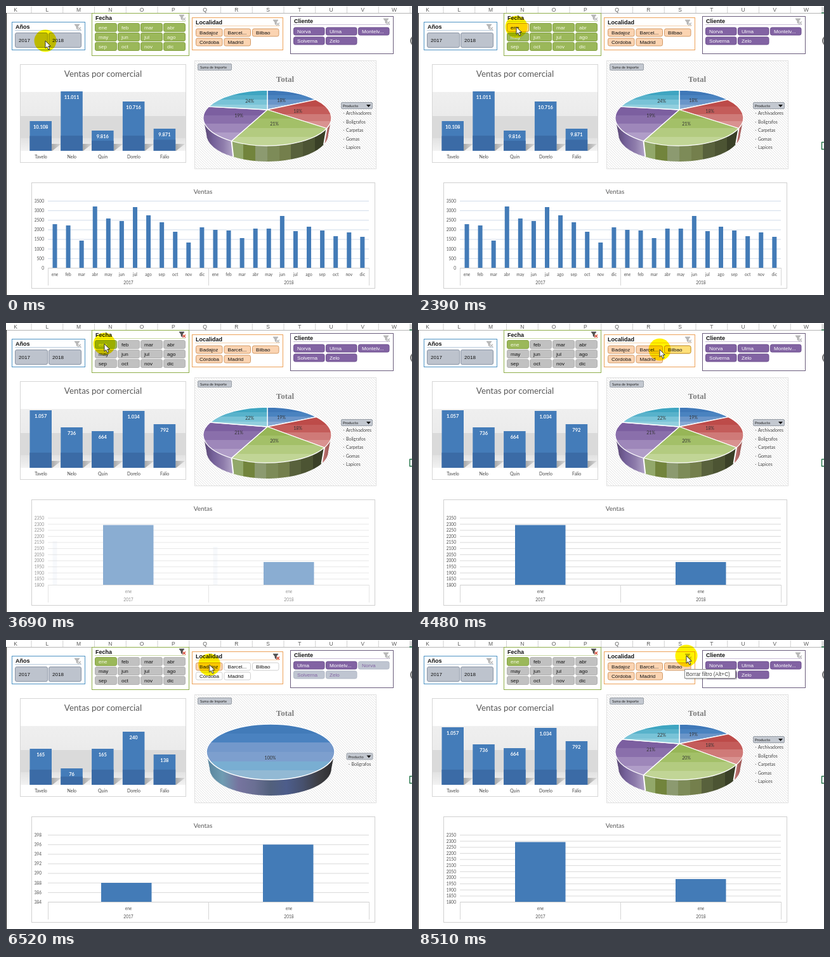
Recreate the animation shown at these times as an HTML page. Size 640 by 457 pixels, loop 9.77 s.

```html
<!DOCTYPE html>
<html lang="es">
<head>
<meta charset="utf-8">
<title>Panel de ventas</title>
<style>
  html, body { margin: 0; width: 100%; height: 100%; overflow: hidden; background: #fff; }
  svg { display: block; width: 640px; height: 457px; }
  text { font-family: Lato, sans-serif; white-space: pre; }
  .ui { font-family: "Liberation Sans", Arial, sans-serif; }
  .serif { font-family: "Liberation Serif", serif; }
  .b { font-weight: 700; }
  .mark { mix-blend-mode: multiply; }
</style>
</head>
<body>
<svg id="stage" viewBox="0 0 640 457" xmlns="http://www.w3.org/2000/svg"></svg>
<script>
const LOOP = 9770;
const stage = document.getElementById('stage');
const MONTHS = 'ene feb mar abr may jun jul ago sep oct nov dic'.split(' ');
const BLUE = '#437bb7';

// ---------- drawing helpers ----------
function layer(html, parent = stage) {
  const g = document.createElementNS('http://www.w3.org/2000/svg', 'g');
  g.innerHTML = html;
  parent.appendChild(g);
  return g;
}
const text = (x, y, s, size, fill = '#505050', anchor = 'start', cls = '') =>
  `<text x="${x}" y="${y}" font-size="${size}" fill="${fill}" text-anchor="${anchor}" class="${cls}">${s}</text>`;
const rect = (x, y, w, h, fill, stroke = 'none', r = 0) =>
  `<rect x="${x}" y="${y}" width="${w}" height="${h}" fill="${fill}" stroke="${stroke}" rx="${r}"/>`;
const path = (d, fill, stroke = 'none', sw = 1) =>
  `<path d="${d}" fill="${fill}" stroke="${stroke}" stroke-width="${sw}" stroke-linejoin="round"/>`;
const grad = (id, colors, down, hard) => {
  const n = colors.length;
  const stops = colors.map((c, i) => hard
    ? `<stop offset="${i / n}" stop-color="${c}"/><stop offset="${(i + 1) / n}" stop-color="${c}"/>`
    : `<stop offset="${i / (n - 1)}" stop-color="${c}"/>`).join('');
  return `<linearGradient id="${id}" x2="${down ? 0 : 1}" y2="${down ? 1 : 0}">${stops}</linearGradient>`;
};

// ---------- timing helpers ----------
function play(el, frames) {
  el.animate(frames, { duration: LOOP, iterations: Infinity });
}
// spans: [from, to, fadeIn, fadeOut]; one running to LOOP stays on to the end
function on(el, ...spans) {
  const f = [];
  const key = (t, opacity) => f.push({ offset: t / LOOP, opacity });
  if (spans[0][0] > 0) key(0, 0);
  for (const [a, b, fi = 0, fo = 0] of spans) {
    if (a > 0) key(a, 0);
    key(a + fi, 1);
    key(b, 1);
    if (b < LOOP) key(b + fo, 0);
  }
  if (f[f.length - 1].offset < 1) key(LOOP, 0);
  play(el, f);
}
function travel(el, pts) {
  play(el, pts.map(([t, x, y]) => ({
    offset: t / LOOP, transform: `translate(${x}px, ${y}px)`, easing: 'ease-in-out' })));
}

// ---------- gradients, hatch, sheet ----------
layer('<defs>' +
  grad('s0', ['#3f78b8', '#4a83c0', '#6a95c9', '#86a9d3'], 1, 1) +
  grad('s1', ['#bd4b49', '#c45c5a', '#cf7a78', '#d99290'], 1, 1) +
  grad('s2', ['#97b657', '#a3c068', '#b3cb80', '#c1d596'], 1, 1) +
  grad('s3', ['#7c5fa0', '#8a6fab', '#9e87ba', '#b09dc8'], 1, 1) +
  grad('s4', ['#3fa5c1', '#58b2cb', '#79c3d7', '#92cfde'], 1, 1) +
  grad('whole', ['#427bb9', '#4a82c0', '#7398cb', '#7d9fce', '#79aed2', '#92b9d4'], 1, 1) +
  grad('sideP', ['#57456f', '#75619a', '#8e7cab', '#b3a6c9']) +
  grad('sideG', ['#92a86a', '#72843c', '#8c9a70', '#7d8b58', '#747f4c', '#58613c', '#4c5433', '#3a4027'], 0, 1) +
  grad('sideR', ['#c98280', '#8f4644']) +
  grad('sideB', ['#56829b', '#6f9cb2', '#76749f', '#6a6f93', '#52607c', '#4d5d8b', '#47516e', '#3e3f44', '#2c2c2e'], 0, 0) +
  grad('wall', ['#efefef', '#ebebeb'], 1) +
  grad('floor', ['#e2e2e2', '#f2f2f2'], 1) +
  grad('shade', ['#a8a8a8', '#dadada']) +
  '<pattern id="hatch" width="4" height="4" patternUnits="userSpaceOnUse">' +
  '<path d="M-1-1L5 5M-1 3L1 5M3-1L5 1" stroke="#dcdcdc" stroke-width=".8"/></pattern></defs>');

let sheet = rect(0, 0, 640, 457, '#fff') + path('M0 11.5H640', 'none', '#b5b5b5') + path('M.5 11V457', 'none', '#111');
[...'KLMNOPQRSTUVW'].forEach((c, i) => {
  const x = 15 + 49.75 * i;
  sheet += text(x, 9, c, 8.5, '#5a5a5a', 'middle', 'ui') + path(`M${x + 25} 1V11`, 'none', '#d0d0d0');
});
sheet += '<circle cx="646" cy="55" r="8" fill="#e8e8e8" stroke="#707070" stroke-width="2"/>';
layer(sheet);
on(layer(rect(636, 2, 4, 9, '#dcdcdc') + path('M636 11H640', 'none', '#217346', 1.5) +
  path('M640 215.5H636.5V226.5H640', 'none', '#217346', 1.4)), [1540, LOOP]);

// ---------- slicers ----------
const GREY = ['#bdc3cd', '#8b95a6', '#111'];
const GREEN = ['#9bb85a', '#84a242', '#f6f9e6'];
const OFF = ['#c1c1c1', '#b2b2b2', '#111'];
const PEACH = ['#fbd4b2', '#d39a66', '#111'];
const BLANK = ['#fff', '#cfcfcf', '#111'];
const PURPLE = ['#8263a3', '#6c4f8d', '#fff'];
const DIM = ['#bfc5d1', '#b0b7c5', '#8263a3'];
const GOLD = ['#ffe07a', '#c79a2c', '#111'];

const button = (x, y, w, h, s, [fill, line, ink]) =>
  rect(x + .5, y + .5, w - 1, h - 1, fill, line, 2.5) + text(x + 6, y + h / 2 + 3.2, s, 8.1, ink, 'start', 'ui');
const grid = (x, y, dx, dy, cols, w, h, labels, style) => labels.map((s, i) =>
  button(x + dx * (i % cols), y + dy * Math.floor(i / cols), w, h, s, style(i))).join('');
const funnel = (x, y, active) =>
  path(`M${x} ${y}h8l-3 4v4l-2-1.5v-2.5z`, active ? '#555' : '#b9b9b9', active ? '#333' : '#a5a5a5', .6) +
  path(`M${x + 5.5} ${y + 4.5}l4.5 4.5m0-4.5l-4.5 4.5`, 'none', active ? '#d8432e' : '#bbb', 1.2);
const frame = (x, y, w, h, title, line, rule) =>
  rect(x + .5, y + .5, w - 1, h - 1, '#fff', line) + text(x + 6, y + 10.5, title, 9, '#111', 'start', 'ui b') +
  path(`M${x + 5} ${y + 13.5}H${x + w - 6}`, 'none', rule);

layer(frame(9, 25, 116, 45, 'Años', '#4f94c4', '#b9cbdc') + funnel(108, 29) +
  grid(14, 42, 53, 0, 2, 52, 24, ['2017', '2018'], () => GREY) +
  frame(135, 11, 154, 68, 'Fecha', '#8fae4b', '#c9d9a5') +
  frame(293, 18, 144, 52, 'Localidad', '#eda25a', '#f4cfa8') +
  frame(448, 16, 163, 60, 'Cliente', '#6a5c7c', '#c9bdd6') + funnel(595, 20));

const dates = style => grid(140, 27, 36, 15, 4, 35, 14, MONTHS, style);
const places = style => grid(299, 35.5, 44.5, 15, 3, 42.5, 13, ['Badajoz', 'Barcel...', 'Bilbao', 'Córdoba', 'Madrid'], style);
const clients = (names, style) => grid(453, 33.5, 51, 15, 3, 49.5, 13, names, style);

on(layer(dates(() => GREEN) + funnel(273, 14)), [0, 2900]);
on(layer(dates(i => i ? OFF : GREEN) + funnel(273, 14, true)), [2900, LOOP]);
on(layer(places(() => PEACH) + funnel(421, 22) +
  clients(['Norva', 'Ulma', 'Montelv...', 'Solverna', 'Zelo'], () => PURPLE)), [0, 5510], [7570, LOOP]);
on(layer(places(i => i ? BLANK : PEACH) + funnel(421, 22, true) +
  clients(['Ulma', 'Montelv...', 'Norva', 'Solverna', 'Zelo'], i => i < 2 ? PURPLE : DIM)), [5510, 7570]);

on(layer(button(140, 27, 35, 14, 'ene', GOLD)), [2330, 2900]);
on(layer(button(388, 35.5, 42.5, 13, 'Bilbao', GOLD)), [4240, 4540]);
on(layer(button(299, 35.5, 42.5, 13, 'Badajoz', GOLD)), [4700, 5510]);
on(layer(rect(418.5, 20.5, 12, 12, '#f7b36a', '#d58a3c') + funnel(421, 22, true)), [7250, 7570]);

// ---------- bars by seller ----------
const colX = i => 37.5 + 48.8 * i;
let base = rect(22.5, 92.5, 261, 155, '#fff', '#d6d6d6') + text(153, 111.5, 'Ventas por comercial', 13.4, '#595959', 'middle') +
  rect(23, 136, 260, 38, 'url(#wall)') + rect(23, 174, 260, 35, '#dadada') + rect(23, 209, 260, 20, 'url(#floor)');
['Tavelo', 'Nelo', 'Quin', 'Dorelo', 'Falio'].forEach((s, i) => {
  const x = colX(i) + 34.5;
  base += text(x - 17, 240.5, s, 7, '#444', 'middle') + path(`M${x} 218H${x + 15}L${x + 1} 229H${x}Z`, 'url(#shade)');
});
layer(base);

const columns = (tops, labels) => tops.map((y, i) => {
  const x = colX(i), h = 229 - y, low = Math.min(h / 2, 24);
  return rect(x, y, 34.5, h, '#447cb9') + rect(x, 229 - low, 34.5, low, '#3b6ba6') +
    text(x + 17.2, y + 11.5, labels[i], 7.5, '#fff', 'middle', 'b');
}).join('');
const colB = layer(columns([138, 165, 171, 139, 160], ['1.057', '736', '664', '1.034', '792']));
const colA = layer(columns([182, 135, 197, 151, 194], ['10.108', '11.011', '9.816', '10.716', '9.871']));
const colC = layer(columns([172, 203, 172, 145, 181], ['165', '76', '165', '240', '138']));

// ---------- pie ----------
layer(rect(297.5, 86.5, 286, 171, '#fff') + rect(297.5, 86.5, 286, 171, 'url(#hatch)', '#e0e0e0') +
  rect(302.5, 91.5, 53, 10, '#c3c8d0', '#9aa0a8', 1.5) + text(306, 98.8, 'Suma de Importe', 5.6, '#222') +
  text(440, 120, 'Total', 13, '#7f7f7f', 'middle', 'serif b'));

function rim(deg, low) {
  const a = deg * Math.PI / 180, [cy, rx, ry] = low ? [203, 96, 43] : [177, 101, 44];
  return (412 + rx * Math.sin(a)).toFixed(1) + ' ' + (cy - ry * Math.cos(a)).toFixed(1);
}
const side = (a, b, id) => path(
  `M${rim(a)}A101 44 0 0 1 ${rim(b)}L${rim(b, 1)}A96 43 0 0 0 ${rim(a, 1)}Z`, `url(#${id})`);

function legend(x, y, items, w) {
  return rect(x + .5, y + .5, w, 10, '#c3c8d0', '#9aa0a8', 1.5) + text(x + 3, y + 8, 'Producto', 6, '#222') +
    path(`M${x + w - 9} ${y + 4}h7l-3.5 4z`, '#111') +
    items.map((s, i) => text(x + 3.5, y + 20 + 13.5 * i, '·', 7, '#444') + text(x + 8, y + 20 + 13.5 * i, s, 7, '#444')).join('');
}
const SPOTS = [[434, 152], [460, 168.5], [423, 189], [367, 176], [384, 153]];
function pie(cuts, shares) {
  const edge = [0, ...cuts, 360];
  let s = side(90, cuts[1], 'sideR') + side(cuts[1], cuts[2], 'sideG') + side(cuts[2], 270, 'sideP');
  for (const c of [cuts[1], cuts[2]]) s += path(`M${rim(c)}L${rim(c, 1)}`, 'none', '#fff', 2);
  shares.forEach((_, i) => {
    s += path(`M412 164L${rim(edge[i])}A101 44 0 0 1 ${rim(edge[i + 1])}Z`, `url(#s${i})`, '#fff', 1.3);
  });
  shares.forEach((p, i) => { s += text(...SPOTS[i], p + '%', 7, '#333', 'middle'); });
  return s + legend(528, 152, ['Archivadores', 'Boligrafos', 'Carpetas', 'Gomas', 'Lapices'], 49);
}
const pieB = layer(pie([50, 117, 214, 297], [19, 18, 20, 21, 22]));
const pieA = layer(pie([49, 112, 214, 294], [18, 18, 21, 19, 24]));
const pieC = layer('<g transform="translate(5 0)">' + side(90, 270, 'sideB') +
  '<ellipse cx="412" cy="177" rx="101" ry="44" fill="url(#whole)" stroke="#fff" stroke-width="1.5"/></g>' +
  text(416.5, 189, '100%', 7, '#333', 'middle') + legend(536.5, 178.5, ['Boligrafos'], 41));

for (const el of [colA, pieA]) on(el, [0, 2930, 0, 470]);
for (const el of [colB, pieB]) on(el, [2990, 5850, 210, 140], [7630, LOOP, 170]);
for (const el of [colC, pieC]) on(el, [5720, 7750, 230, 240]);

// ---------- monthly sales ----------
layer(rect(40.5, 279.5, 541, 167, '#fff', '#d0d0d0') + text(310.5, 297, 'Ventas', 10, '#595959', 'middle'));

function scale(max, step, n, x, color) {
  let s = '';
  for (let i = 0; i < n; i++) {
    const y = 308.5 + 106 * i / (n - 1);
    s += path(`M66 ${y}H572`, 'none', i < n - 1 ? color : '#c9c9c9', .9) + text(x, y + 2.4, max - step * i, 6.6, '#505050', 'end');
  }
  return s;
}
const years = path('M66.5 414V442M319.5 414V442M572.5 414V442', 'none', '#d6d6d6') +
  text(193, 440, '2017', 6.6, '#505050', 'middle') + text(446, 440, '2018', 6.6, '#505050', 'middle');
const pair = (x1, y1, x2, y2) => rect(x1, y1, 79.5, 414 - y1, BLUE) + rect(x2, y2, 79.5, 414 - y2, BLUE) +
  text(193, 426.5, 'ene', 6.6, '#505050', 'middle') + text(446, 426.5, 'ene', 6.6, '#505050', 'middle') + years;

const tops = [345, 347, 371, 317, 336, 340, 318, 331, 342, 357, 374, 350,
  354, 355, 367, 352, 352, 332, 356, 349, 355, 364, 358, 365];
let kept = scale(3500, 500, 8, 60, '#ccd9e8') + years, rest = '';
tops.forEach((y, i) => {
  const x = 77 + 21.08 * i, bar = rect(x - 3.5, y, 7, 414 - y, BLUE);
  if (i % 12) rest += bar; else kept += bar;
  rest += text(x, 426.5, MONTHS[i % 12], 6.6, '#505050', 'middle');
});
on(layer(kept), [0, 3450, 0, 250]);
on(layer(rest), [0, 2930, 0, 420]);
on(layer(scale(2350, 50, 12, 60, '#d5d5d5') + pair(153, 319.5, 406, 378)), [3500, 5570, 310, 120], [7570, LOOP, 120]);
on(layer(scale(398, 2, 8, 56, '#d5d5d5') + pair(150, 384, 405, 323.5)), [5570, 7570, 120, 120]);

// ---------- tooltip and pointer ----------
on(layer(rect(422, 48, 81, 15, '#0002') + rect(420.5, 46.5, 80, 14, '#fff', '#8a8a8a') +
  text(422.5, 56.8, 'Borrar filtro (Alt+C)', 8.3, '#444', 'start', 'ui')), [8450, LOOP, 60]);

const route = [
  [0, 62, 55], [1060, 62, 55], [1540, 662, 225], [2030, 122, 36], [2390, 155, 33], [3720, 155, 33],
  [4300, 410, 44], [4480, 381, 42], [4720, 321, 39], [6500, 321, 39], [6760, 290, 41], [7250, 423, 25], [LOOP, 423, 25]];
const glow = layer('<circle r="17.5" fill="#fff200"/>');
glow.classList.add('mark');
travel(glow, route);
on(glow, [0, 2720], [3630, 4920], [6520, 7310], [8250, LOOP]);

const pointer = layer('');
const ring = layer([16, 10.8, 5.6].map(r => `<circle r="${r}" fill="none" stroke="#e3171b" stroke-width="2.3"/>`).join(''), pointer);
layer(path('M0 0V11.8L2.7 9.3 4.8 13.9 6.9 13 4.8 8.5H8.4Z', '#fff', '#222', .9), pointer);
travel(pointer, route);

const clicks = [[2920, 3240], [5690, 5990], [7740, 7990]];
on(ring, ...clicks);
const pulse = [{ offset: 0, transform: 'scale(.2)' }];
for (const [a, b] of clicks) {
  pulse.push({ offset: a / LOOP, transform: 'scale(.2)' }, { offset: (a + 220) / LOOP, transform: 'scale(1)' },
    { offset: b / LOOP, transform: 'scale(1)' }, { offset: b / LOOP, transform: 'scale(.2)' });
}
pulse.push({ offset: 1, transform: 'scale(.2)' });
play(ring, pulse);
</script>
</body>
</html>
```
